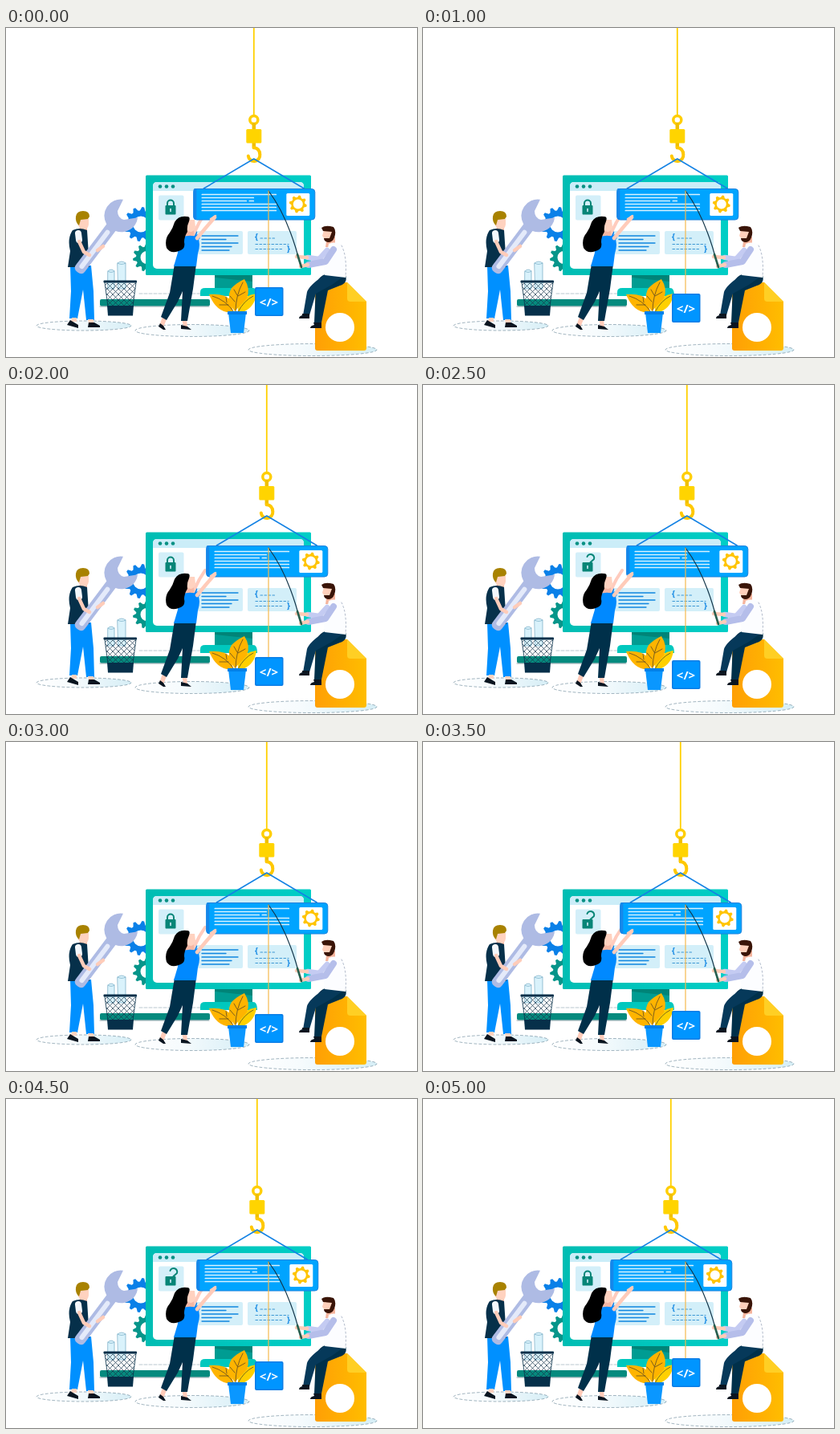
Animation of 512 by 410 pixels, one loop 5.5 s. Source, as an HTML page:

```html
<!DOCTYPE html>
<html lang="en">
<head>
<meta charset="utf-8">
<title>Building a page</title>
<style>
html, body { margin: 0; width: 100%; height: 100%; overflow: hidden; background: #fff; }
svg { display: block; width: 100%; height: 100%; }
text { font-family: "Open Sans", "Liberation Sans", sans-serif; font-weight: 700; }
</style>
</head>
<body>
<svg viewBox="0 0 512 410" fill="none" stroke-linecap="round" stroke-linejoin="round">
  <defs>
    <linearGradient id="page" x1="0" y1="0" x2="1" y2="0">
      <stop stop-color="#ff9f05"/><stop offset="1" stop-color="#ffbd00"/>
    </linearGradient>
    <linearGradient id="shade">
      <stop stop-color="#fff"/><stop offset=".4" stop-color="#f6fbfd"/><stop offset="1" stop-color="#d6eef6"/>
    </linearGradient>
    <linearGradient id="teal" x2="1" y2="0">
      <stop stop-color="#00bdb3"/><stop offset="1" stop-color="#00cec6"/>
    </linearGradient>
    <clipPath id="bin"><path d="M123 318H162L158 347H127Z"/></clipPath>
  </defs>

  <!-- ground -->
  <g fill="url(#shade)" stroke="#5f7f90" stroke-width=".6" stroke-dasharray="3 3">
    <ellipse cx="97" cy="371" rx="59" ry="6"/>
    <ellipse cx="232" cy="377" rx="71" ry="7.5"/>
    <ellipse cx="382" cy="401" rx="80" ry="7.5"/>
  </g>
  <path d="M166 331H242" stroke="#8ba3b0" stroke-width=".6" stroke-dasharray="4 2"/>
  <rect x="117" y="338" width="137" height="8.500" rx="2" fill="#058a7e"/>
  <path d="M117 347H253" stroke="#5f7a86" stroke-width=".7"/>

  <!-- monitor -->
  <path class="gear" data-g="168 244.500 21.500 17 12 10" fill="#0a80e8"/>
  <path class="gear" data-g="175.500 286 17.500 13.500 11 8" fill="#07958a"/>
  <path d="M260 307H307V326H260Z" fill="#009c92"/>
  <path d="M260 307H307V316L260 311Z" fill="#008478"/>
  <path d="M242 329Q242 324 248 324H308Q313 324 313 334H242Z" fill="#00c8be"/>
  <rect x="174" y="183.500" width="206" height="124.500" rx="1.500" fill="url(#teal)"/>
  <rect x="183" y="192" width="188" height="108" rx="5" fill="#fff"/>
  <path d="M183 203V197Q183 192 188 192H366Q371 192 371 197V203Z" fill="#cbedf8"/>
  <g fill="#079184"><circle cx="192" cy="197.500" r="2.300"/><circle cx="200" cy="197.500" r="2.300"/><circle cx="208" cy="197.500" r="2.300"/></g>
  <g fill="#d3eff9">
    <rect x="190" y="208.500" width="31.500" height="31" rx="2"/>
    <rect x="232" y="253" width="63" height="29" rx="2"/>
    <rect x="301" y="253" width="61" height="29" rx="2"/>
  </g>
  <rect x="198.500" y="221" width="13" height="11.500" rx="1" fill="#078577"/>
  <path d="M205 225.500V228.500" stroke="#d3edf9" stroke-width="1.600"/>
  <path id="shackle" stroke="#078577" stroke-width="2"/>
  <path d="M244 259H289M244 263.500H274M244 268H289M244 272.500H281M244 277H278" stroke="#0f86e0" stroke-width="1.300"/>
  <g fill="#1488e4" font-size="10"><text x="310" y="264">{</text><text x="350" y="279">}</text></g>
  <path d="M317 262H337M311 269.500H352M311 275.500H346" stroke="#3d98d4" stroke-width="1.200" stroke-dasharray="2.500 2.500"/>

  <!-- woman's far arm, behind the panel -->
  <path d="M229 264L235 255" stroke="#0080ee" stroke-width="6"/>
  <path d="M233 258L241 242L248 231" stroke="#ffcbbd" stroke-width="4"/>

  <!-- crane load -->
  <g id="crane">
    <path d="M308.500 0V110" stroke="#ffd000" stroke-width="1.800"/>
    <circle cx="308.500" cy="114.500" r="5" stroke="#ffce00" stroke-width="3.500"/>
    <path d="M308.500 120V128M308.500 143V149" stroke="#f0bf00" stroke-width="4.500"/>
    <rect x="299" y="126" width="19" height="17.500" rx="1.500" fill="#ffd400"/>
    <path d="M308.500 149Q316 150 316 158A7.200 7.200 0 0 1 301.500 159.500" stroke="#ffc800" stroke-width="4"/>
    <path d="M246 200L308.500 163L371 200" stroke="#1482e4" stroke-width="1.500"/>
    <rect x="233.500" y="200.500" width="151" height="38.500" rx="4" fill="#00a4ff" stroke="#1a80dc"/>
    <path d="M237 200H235Q233 200 233 204V235Q233 239 237 239Z" fill="#1587ea"/>
    <path d="M244 207.500H336M244 211.500H308M244 215.500H299M303 215.500H308M244 219.500H336M244 223.500H336M244 227.500H336" stroke="#d9f2ff" stroke-width="1.700"/>
    <rect x="349" y="206" width="29" height="28" rx="1.500" fill="#fff"/>
    <path class="gear" data-g="363.500 219.500 11 8.500 8 6" fill="#ffc400"/>
  </g>

  <!-- worker with wrench -->
  <path d="M80 296H106L109 328L110 364H100L96 326L89 362H79L81 328Z" fill="#0090ff"/>
  <path d="M82 361H88V366H81ZM102 363H109V368H103Z" fill="#ffd2bf"/>
  <path d="M80 364L90 370V374L76 370ZM103 367H110L117 371V373H102Z" fill="#0a1520"/>
  <path d="M92 246H101V257H91Z" fill="#f5b9a5"/>
  <path d="M89 238H103V245Q102 251 97 251Q90 250 89 242Z" fill="#ffd2bf"/>
  <path d="M87 235Q88 228 96 228Q104 228 104 235L102 238L93 239L91 246Q86 242 87 235Z" fill="#a88200"/>
  <path d="M83 252Q92 248 101 252L104 298H77L80 278Q76 262 83 252Z" fill="#06304a"/>
  <g transform="translate(142 234) rotate(37)">
    <path d="M-9-18.500A20.500 20.500 0 0 0-7 18.500V82Q-7 88 0 88Q7 88 7 82V18.500A20.500 20.500 0 0 0 19-11.500L7 1Q-1 4-6-3Z" fill="#aebbe4"/>
    <path d="M0 26V79" stroke="#e4eafa" stroke-width="6"/>
  </g>
  <path d="M90 256L91 264" stroke="#f4f8fd" stroke-width="8"/>
  <path d="M91 266L97 279L104 283M114 277L121 272" stroke="#ffccb9" stroke-width="4.500"/>

  <!-- bin -->
  <g fill="#d9f2fb" stroke="#7fb2c9" stroke-width=".8">
    <path d="M127 303Q131 299 135 303V325H127ZM139 293Q144 289 149 293V325H140Z"/>
    <path d="M127 303Q131 306 135 303M139 293Q144 296 149 293" fill="none"/>
  </g>
  <path id="mesh" clip-path="url(#bin)" stroke="#18344b" stroke-width=".7"/>
  <path d="M123 317L127 347M162 317L158 347" stroke="#06304a" stroke-width=".8"/>
  <rect x="121.500" y="314.500" width="41.500" height="3" rx="1" fill="#06304a"/>
  <path d="M126 346H159L158 358.500H127Z" fill="#06304a"/>

  <!-- woman -->
  <path d="M195 360L200 363L196 373L191 371ZM219 363H225L226 373L221 371Z" fill="#ffcbb9"/>
  <path d="M192 368L196 371L199 376H196L190 372ZM218 370L226 372L231 376L218 375Z" fill="#0a1520"/>
  <path d="M210 294H237L233 325L226 365H218L220 328L214 341L200 364L193 360L204 330Z" fill="#00304a"/>
  <path d="M225 249H234V261H223Z" fill="#f4b7a4"/>
  <path d="M224 239H235L236 248Q235 254 229 254L223 250Z" fill="#ffd2c0"/>
  <path d="M217 262Q228 256 239 261Q243 269 239 281L237 297H209L214 280Q212 270 217 262Z" fill="#0089ff"/>
  <path d="M226 235Q215 233 210 242Q208 249 204 255Q197 263 200 274Q205 282 215 278Q224 276 222 267Q222 260 226 254Q225 247 228 241Q230 235 226 235Z" fill="#000"/>
  <path d="M230 267L238 261" stroke="#0089ff" stroke-width="7"/>
  <path d="M238 262L248 250L260 236" stroke="#ffcbb9" stroke-width="4.500"/>
  <path d="M255 238L261 234" stroke="#ffcbb9" stroke-width="2.500"/>

  <!-- plant -->
  <g fill="#ffb400">
    <path d="M289 353Q288 335 312 331Q310 348 295 354Z" fill="#ffd000"/>
    <path d="M285 353Q273 337 281 324Q288 317 297 313Q305 325 300 337Z"/>
    <path d="M283 354Q263 357 253 332Q271 330 280 339Z"/>
  </g>
  <path d="M286 354Q286 333 295 317M285 341L279 334M288 333L284 326M289 334L298 329M284 354Q274 339 257 334M275 342L274 335M277 345L266 345M289 354Q296 340 308 334" stroke="#5b4a24" stroke-width=".8"/>
  <path d="M277 355H299L296 380H280Z" fill="#0a97ff"/>
  <path d="M276 353H300V357H276Z" fill="#0080ea"/>

  <!-- page -->
  <path d="M387 317H425L449 341V399Q449 402 446 402H388Q385 402 385 399V320Q385 317 387 317Z" fill="url(#page)"/>
  <path d="M425 317L449 341H429Q425 341 425 337Z" fill="#ffcf24"/>
  <circle cx="416" cy="373" r="18" fill="#fff"/>

  <!-- angler -->
  <path d="M400 306L423 308Q426 318 416 321L401 327L393 367H384L386 323Q387 310 400 306Z" fill="#00304a"/>
  <path d="M398 307L420 310L406 320L386 331L378 358H370L375 329Q378 320 398 307Z" fill="#06395a"/>
  <path d="M369 356H378L378 362H365Q365 359 369 358ZM383 367H393V374H379Q379 371 384 370Z" fill="#0a1520"/>
  <path d="M400 260H410V273H398Z" fill="#f4b49d"/>
  <path d="M396 252H408V263Q403 267 397 263L394 259Z" fill="#ffd0bb"/>
  <path d="M393 249Q398 245 408 248Q412 253 409 261Q407 267 401 267Q396 266 396 262L403 262L406 254L395 253Z" fill="#3a1508"/>
  <path d="M402 269Q412 265 420 272Q425 288 423 311L397 308Q394 292 400 279Z" fill="#fcfdff"/>
  <path d="M418 271Q425 285 423 309" stroke="#8f9bb0" stroke-width=".7" stroke-dasharray="2 3"/>
  <path d="M400 277L390 288L376 286" stroke="#c4cbf2" stroke-width="6.500"/>
  <path d="M408 276L398 291L377 295" stroke="#b5beea" stroke-width="8"/>
  <path d="M375 286L362 285M376 295L367 297" stroke="#ffccb7" stroke-width="4.500"/>
  <path d="M327 203Q352 236 367 296" stroke="#123448" stroke-width="1.200"/>
  <path d="M363 282L368 298" stroke="#28604f" stroke-width="2.600"/>

  <!-- catch -->
  <path id="line" stroke="#f5b94e" stroke-width="1.200"/>
  <g id="catch">
    <rect x="310" y="323" width="35.500" height="36" rx="2" fill="#0a7de6"/>
    <rect x="311.500" y="324.500" width="32.500" height="33" rx="1.500" fill="#0095ff"/>
    <text x="327.500" y="346.500" text-anchor="middle" font-size="15" fill="#fff">&lt;/&gt;</text>
  </g>
</svg>
<script>
const STEP = 500, FRAMES = 11, SHIFT = 4;
const get = id => document.getElementById(id);

function gearPath(cx, cy, outer, inner, teeth, hole) {
  const points = [];
  for (let i = 0; i < teeth * 4; i++) {
    const angle = (i + 0.5) / (teeth * 4) * 2 * Math.PI;
    const r = i % 4 < 2 ? outer : inner;
    points.push(`${cx + r * Math.cos(angle)} ${cy + r * Math.sin(angle)}`);
  }
  return `M${points.join("L")}ZM${cx - hole} ${cy}` +
    `a${hole} ${hole} 0 1 0 ${2 * hole} 0a${hole} ${hole} 0 1 0 ${-2 * hole} 0Z`;
}

for (const gear of document.querySelectorAll(".gear")) {
  gear.setAttribute("fill-rule", "evenodd");
  gear.setAttribute("d", gearPath(...gear.dataset.g.split(" ").map(Number)));
}

let mesh = "";
for (let x = 90; x < 165; x += 7) mesh += `M${x} 317l30 30M${x + 30} 317l-30 30`;
get("mesh").setAttribute("d", mesh);

const CLOSED = "M201 221V218.500a4 4 0 0 1 8 0V221";
const OPEN = "M208.500 221L213 217a4.500 4.500 0 1 0-8.500-3";

function draw(time) {
  const frame = Math.floor(time / STEP) % FRAMES;
  const offset = SHIFT * (5 - Math.abs(frame - 5)); // out and back
  get("crane").setAttribute("transform", `translate(${offset + 0.3} 0)`);
  get("catch").setAttribute("transform", `translate(0 ${offset})`);
  get("line").setAttribute("d", `M327 203V${323 + offset}`);
  get("shackle").setAttribute("d", frame % 2 ? OPEN : CLOSED);
}

const start = performance.now();
function tick() {
  draw(performance.now() - start);
  requestAnimationFrame(tick);
}
tick();
</script>
</body>
</html>
```
